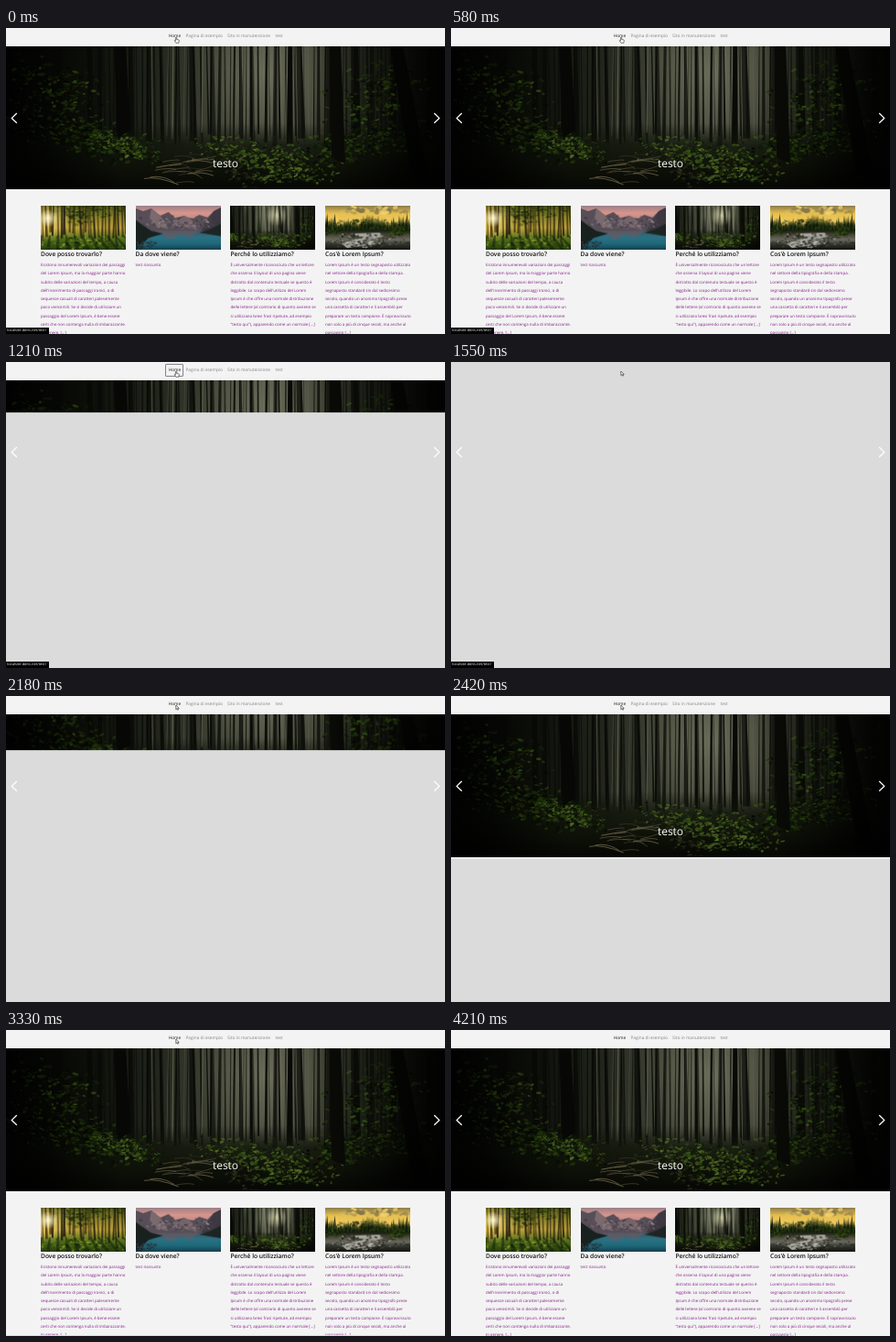
An HTML page with a canvas that plays this animation: 480x334 px, repeating every 4.24 s.

```html
<!DOCTYPE html>
<html lang="it">
<head>
<meta charset="utf-8">
<style>
html, body { margin: 0; width: 100%; height: 100%; overflow: hidden; background: #f3f3f3; }
body { position: relative; font-family: "Open Sans", "Noto Sans", sans-serif; text-rendering: geometricPrecision; }
body > * { position: absolute; margin: 0; white-space: pre; }
nav span { position: absolute; top: 4px; font-size: 4.75px; line-height: 10px; color: #858585; }
nav .on { color: #222; }
#ring { left: 174px; top: 2px; width: 18px; height: 12px; border: 1px solid #80838c; border-radius: 1px; }
#hero { left: 0; top: 20px; width: 480px; height: 156px; overflow: hidden; background: #050604; }
#hero canvas { display: block; }
#title { left: 0; width: 480px; top: 138px; font-size: 12px; line-height: 20px; color: #fff; text-align: center; }
.card { top: 194px; width: 94px; }
.card canvas { display: block; width: 93px; height: 48px; }
.card h2 { margin: 0; font-size: 6.67px; line-height: 9px; font-weight: 600; color: #111; }
.card p { margin: 4px 0 0; font-size: 4.4px; line-height: 9.25px; color: #84208a; }
#cover { left: 0; top: 0; width: 480px; height: 334px; background: #dbdbdc; }
#status { left: 0; top: 327px; width: 46px; height: 7px; padding-left: 1.3px; background: #000; color: #eee; font-size: 4.04px; line-height: 7px; }
svg { left: 0; top: 0; }
</style>
</head>
<body>
<nav><span class="on" style="left:177.7px">Home</span><span style="left:196.5px">Pagina di esempio</span><span style="left:242px">Sito in manutenzione</span><span style="left:294.5px">test</span></nav>
<div id="ring"></div>
<div id="hero"><canvas width="480" height="156"></canvas></div>
<div id="title">testo</div>
<div id="cover"></div>
<svg width="480" height="334" fill="none" stroke="#fff" stroke-width="1.3">
  <path d="M11.8 93L6.3 98.4L11.8 103.8M468.2 93L473.7 98.4L468.2 103.8"/>
  <g fill="#fff" stroke="#222" stroke-width=".6" stroke-linejoin="round">
    <path id="hand" d="M185.6 10.2q.7-.6 1.1.2v2.1l2.1.5q.6.2.5.9l-.5 2.4h-2.9l-1.8-2.6q.2-.8 1.5.1z"/>
    <path id="arrow" d="M185.8 10v4.7l1.1-1l.8 1.6l.8-.4l-.8-1.5h1.5z"/>
  </g>
</svg>
<div id="status">localsite.ddns.net/test/</div>
<script>
const $ = id => document.getElementById(id);
let seed = 7;
const rand = (a = 0, b = 1) => {
  seed = (seed * 16807) % 2147483647;
  return a + (b - a) * seed / 2147483647;
};
const spread = () => rand(-1, 1) * rand(.3, 1);

function gradient(g, stops, x, y, w, h, across) {
  const fill = across ? g.createLinearGradient(x, 0, x + w, 0) : g.createLinearGradient(0, y, 0, y + h);
  stops.forEach((c, i) => fill.addColorStop(i / (stops.length - 1), c));
  g.fillStyle = fill;
  g.fillRect(x, y, w, h);
}

function shape(g, color, ...points) {
  g.fillStyle = color;
  g.beginPath();
  for (let i = 0; i < points.length; i += 2) g.lineTo(points[i], points[i + 1]);
  g.fill();
}

// Leaves, moss or stones scattered in an ellipse that may lean by `slope`.
function dots(g, n, cx, cy, rx, ry, size, colors, slope = 0) {
  for (let i = 0; i < n; i++) {
    const dx = rx * spread();
    g.fillStyle = colors[i % colors.length];
    g.globalAlpha = rand(.3, .9);
    g.beginPath();
    g.ellipse(cx + dx, cy + ry * spread() + dx * slope, size * rand(.5, 1.8), size * rand(.3, .9), rand(-.6, .6), 0, 7);
    g.fill();
  }
  g.globalAlpha = 1;
}

function glow(g, x, y, r, color) {
  const fill = g.createRadialGradient(x, y, 0, x, y, r);
  fill.addColorStop(0, color);
  fill.addColorStop(1, color.slice(0, 7) + "00");
  g.fillStyle = fill;
  g.fillRect(x - r, y - r, 2 * r, 2 * r);
}

function trunks(g, n, from, to, bottom, thick, color) {
  for (let i = 0; i < n; i++) {
    const x = from + (to - from) * (i + rand()) / n, t = thick * rand(.4, 1.4);
    const lean = rand(-2, 2), foot = bottom + rand(-5, 9);
    g.globalAlpha = rand(.6, 1);
    shape(g, color, x + lean, 0, x + lean + t * .7, 0, x + t, foot, x, foot);
  }
  g.globalAlpha = 1;
}

function darkForest(g) {
  const moss = ["#263f0d", "#060804", "#3a5c14", "#121d08", "#0a0f05", "#1f330b"];
  const lit = ["#47631d", "#0f1409", "#2f4a14", "#5a7327", "#191f0e"];
  gradient(g, ["#050604", "#0c0e08", "#20231a", "#45483a", "#4a4c3e", "#1b1e15", "#070905"], 0, 0, 480, 156, true);
  glow(g, 284, 30, 75, "#7c7d68b0");
  trunks(g, 70, 90, 420, 100, 2, "#0d0f0a");
  trunks(g, 22, 150, 350, 96, 1.2, "#5b5c4b");
  trunks(g, 26, 0, 480, 104, 6, "#080906");
  gradient(g, ["#0b0f0600", "#10150ad0", "#0e1108", "#060704"], 0, 84, 480, 72);
  dots(g, 260, 50, 45, 62, 38, 2, moss, .3);
  dots(g, 480, 85, 98, 95, 24, 1.9, moss, .25);
  dots(g, 320, 405, 60, 65, 45, 2, moss, -.25);
  dots(g, 380, 385, 108, 95, 22, 1.9, moss, -.2);
  dots(g, 200, 130, 108, 45, 14, 1.6, lit, .3);
  dots(g, 420, 268, 118, 72, 20, 1.6, lit, .1);
  dots(g, 200, 310, 138, 65, 14, 1.8, lit);
  dots(g, 110, 255, 136, 28, 18, 1.8, ["#08090a", "#14160d", "#2b2b1c"], .6);
  shape(g, "#070805", 118, 0, 131, 0, 136, 92, 122, 100);
  shape(g, "#090a06", 354, 0, 366, 0, 371, 128, 356, 122);
  shape(g, "#060704", 420, 0, 434, 0, 462, 142, 444, 142);
  g.strokeStyle = "#7d7255";
  for (let i = 0; i < 22; i++) {
    const x = rand(150, 210), y = rand(118, 150);
    g.lineWidth = rand(.4, 1.1);
    g.globalAlpha = rand(.3, .85);
    g.beginPath();
    g.moveTo(x, y);
    g.quadraticCurveTo(x + 14, y - 3, x + rand(15, 42), y + rand(-8, 8));
    g.stroke();
  }
  g.globalAlpha = 1;
  gradient(g, ["#000000d0", "#00000030", "#00000000", "#00000000", "#00000000", "#00000000", "#00000030", "#000000d0"], 0, 0, 480, 156, true);
  glow(g, 20, 165, 110, "#000000f0");
  glow(g, 465, 165, 105, "#000000f0");
}

function sunnyForest(g) {
  gradient(g, ["#3d4a17", "#8c842c", "#c0a23a", "#55701d", "#263d0e"], 0, 0, 94, 49);
  dots(g, 160, 50, 9, 50, 13, 1.8, ["#26380f", "#5d7020", "#1c2a0c", "#96912f"]);
  glow(g, 9, 15, 24, "#ffe27ae0");
  trunks(g, 24, 8, 94, 33, 2, "#1f190b");
  trunks(g, 3, 0, 12, 34, 2, "#4a3310");
  dots(g, 200, 47, 41, 48, 8, 1.4, ["#6c8c22", "#1e3209", "#8f9c30", "#14240a", "#486718"]);
  for (let i = 0; i < 12; i++) shape(g, "#12200890", i * 9, 33, i * 9 + 2, 33, i * 11 - 1, 49, i * 11 - 5, 49);
  glow(g, 8, 14, 10, "#fff9d0ff");
}

function lake(g) {
  gradient(g, ["#9c8088", "#d8958b", "#c08b8a", "#8a7181"], 0, 0, 94, 24);
  shape(g, "#574e57", 0, 3, 8, 6, 17, 3, 27, 11, 36, 7, 44, 14, 53, 11, 62, 15, 70, 10, 79, 13, 86, 6, 94, 2, 94, 34, 0, 34);
  shape(g, "#7b6a6d", 17, 3, 27, 11, 36, 26, 24, 23, 15, 14);
  shape(g, "#75646a", 53, 11, 62, 15, 68, 27, 55, 24, 46, 19);
  shape(g, "#3d3841", 86, 6, 94, 2, 94, 34, 72, 28);
  dots(g, 170, 47, 19, 47, 8, 1.2, ["#a5979c", "#39343d", "#6f6269", "#2e2a32", "#877a80"]);
  gradient(g, ["#3d5864", "#2b7183", "#1f6a7c", "#173f4d"], 0, 28, 94, 21);
  shape(g, "#6d5a63a0", 20, 28, 70, 28, 60, 36, 50, 32, 38, 38);
  shape(g, "#19211f", 0, 16, 8, 22, 17, 28, 30, 31, 14, 36, 0, 49);
  shape(g, "#1d2524", 94, 20, 82, 26, 70, 30, 94, 34);
  dots(g, 60, 12, 44, 20, 6, 1.3, ["#1b2d31", "#3b474a", "#122024"], -.1);
}

function river(g) {
  gradient(g, ["#8d7d4c", "#e6bf4e", "#efca60", "#77653a"], 0, 0, 94, 26);
  dots(g, 45, 55, 4, 45, 5, 3, ["#7c6f4b", "#f3d36f", "#96864f"]);
  for (let i = 0; i < 46; i++) {
    const x = i * 2.1, h = rand(5, 13) + (x > 36 ? 6 : 0) * Math.sin(x / 11) ** 2 + (x < 12 ? 6 : 0);
    shape(g, i % 2 ? "#10190a" : "#233311", x - 2, 30, x, 26 - h, x + 2, 30);
  }
  dots(g, 150, 47, 21, 48, 7, 1.3, ["#0f1809", "#35491a", "#1c2a0f"]);
  gradient(g, ["#141b0d", "#484638", "#6b6a60", "#2e3029", "#12160e"], 0, 27, 94, 22);
  shape(g, "#a7a59d", 32, 31, 60, 30, 64, 34, 50, 38, 56, 43, 24, 47, 18, 42, 40, 36);
  dots(g, 190, 47, 39, 48, 10, 1.3, ["#161b11", "#5f5f55", "#0f140b", "#bcb9b0", "#32352b"]);
  dots(g, 120, 80, 27, 17, 9, 1.4, ["#142108", "#40581a", "#1f300e"]);
  dots(g, 80, 7, 28, 14, 6, 1.4, ["#12200a", "#36481a"]);
}

const heroCanvas = document.querySelector("#hero canvas");
darkForest(heroCanvas.getContext("2d"));

function forestPath(g) {
  g.filter = "brightness(1.4)";
  g.drawImage(heroCanvas, 125, 0, 299, 156, 0, 0, 94, 49);
  g.filter = "none";
  glow(g, 51, 11, 12, "#e8e6b8c0");
  trunks(g, 9, 0, 94, 34, 2.5, "#0c0e07");
  dots(g, 110, 47, 38, 46, 9, 1.2, ["#4e7419", "#0e1607", "#2b4810", "#7b8a48"]);
}

const cards = [
  [38, sunnyForest, "Dove posso trovarlo?", `Esistono innumerevoli variazioni dei passaggi
del Lorem Ipsum, ma la maggior parte hanno
subito delle variazioni del tempo, a causa
dell'inserimento di passaggi ironici, o di
sequenze casuali di caratteri palesemente
poco verosimili. Se si decide di utilizzare un
passaggio del Lorem Ipsum, è bene essere
certi che non contenga nulla di imbarazzante.
In genere, [...]`],
  [141.6, lake, "Da dove viene?", "test riassunto"],
  [245.4, forestPath, "Perché lo utilizziamo?", `È universalmente riconosciuto che un lettore
che osserva il layout di una pagina viene
distratto dal contenuto testuale se questo è
leggibile. Lo scopo dell'utilizzo del Lorem
Ipsum è che offre una normale distribuzione
delle lettere (al contrario di quanto avviene se
si utilizzano brevi frasi ripetute, ad esempio
"testo qui"), apparendo come un normale [...]`],
  [349, river, "Cos'è Lorem Ipsum?", `Lorem Ipsum è un testo segnaposto utilizzato
nel settore della tipografia e della stampa.
Lorem Ipsum è considerato il testo
segnaposto standard sin dal sedicesimo
secolo, quando un anonimo tipografo prese
una cassetta di caratteri e li assemblò per
preparare un testo campione. È sopravvissuto
non solo a più di cinque secoli, ma anche al
passaggio [...]`]
];
for (const [x, paint, title, text] of cards) {
  const card = document.createElement("section");
  card.className = "card";
  card.style.left = x + "px";
  card.innerHTML = `<canvas width="94" height="49"></canvas><h2>${title}</h2><p>${text}</p>`;
  paint(card.firstChild.getContext("2d"));
  $("cover").before(card);
}

// CSS "ease": cubic-bezier(.25, .1, .25, 1)
function ease(x) {
  if (x <= 0 || x >= 1) return x <= 0 ? 0 : 1;
  let lo = 0, hi = 1, s;
  for (let i = 0; i < 24; i++) {
    s = (lo + hi) / 2;
    if (.75 * s * (1 - s) + s ** 3 < x) lo = s; else hi = s;
  }
  return .3 * s * (1 - s) ** 2 + 3 * s * s * (1 - s) + s ** 3;
}

const LOOP = 4240, STAGE = 334, RELOAD = 1550, REVEAL = 1967;
const show = (id, on) => $(id).style.visibility = on ? "visible" : "hidden";

function render(t) {
  const y = STAGE * (t < RELOAD ? 1 - ease((t - 783) / 800) : ease((t - REVEAL) / 1467));
  $("cover").style.transform = `translateY(${y}px)`;
  // The hero picture stays centred in the part already uncovered.
  const shift = t < RELOAD ? 0 : Math.min(0, (y - 176) / 2);
  heroCanvas.style.transform = `translateY(${shift}px)`;
  show("ring", t >= 700 && t < RELOAD);
  show("status", t < REVEAL);
  show("hand", t < 1400);
  show("arrow", t >= 1400 && t < 3940);
}

const start = performance.now();
function tick() {
  render((performance.now() - start) % LOOP);
  requestAnimationFrame(tick);
}
render(0);
requestAnimationFrame(tick);
</script>
</body>
</html>
```
